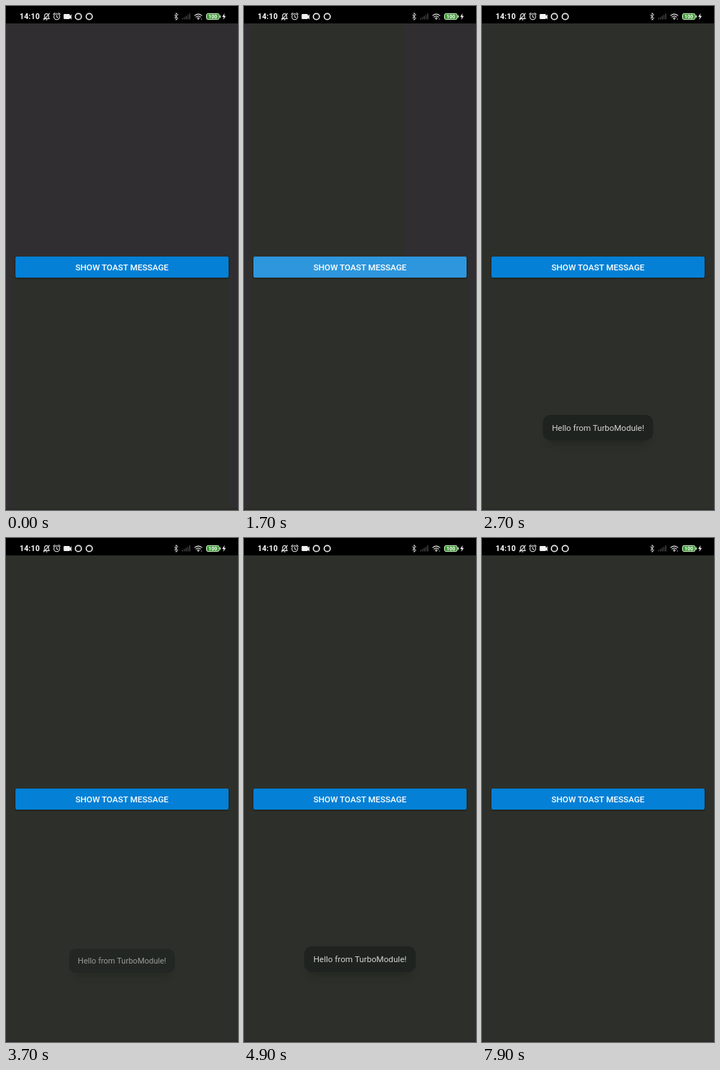
An HTML page that plays this animation: 320 by 694 pixels, repeating every 8.1 s.

```html
<!DOCTYPE html>
<html lang="en">
<head>
<meta charset="utf-8">
<title>Toast demo</title>
<style>
  html, body { margin: 0; width: 100%; height: 100%; overflow: hidden; background: #2d302a; }
  svg { display: block; width: 320px; height: 694px; }
  text { font-family: Roboto, "Noto Sans", sans-serif; fill: #fff; }
  .mid { text-anchor: middle; }
  .line { fill: none; stroke: #e4e4e4; stroke-width: 1.1; stroke-linecap: round; stroke-linejoin: round; }
  .solid { fill: #f0f0f0; }
</style>
</head>
<body>
<svg viewBox="0 0 320 694">
  <defs>
    <filter id="soft" x="-20%" y="-60%" width="140%" height="240%"><feGaussianBlur stdDeviation="5"/></filter>
    <filter id="edge" x="-5%" y="-30%" width="110%" height="160%"><feGaussianBlur stdDeviation="1"/></filter>
  </defs>

  <rect width="320" height="694" fill="#2d302a"/>
  <g id="tint" fill="#302e30">
    <rect id="upper" y="24" height="351"/>
    <rect y="24" width="9" height="670"/>
    <rect x="308" y="24" width="12" height="670"/>
  </g>
  <rect y="692" width="320" height="2" fill="#272a26"/>

  <!-- status bar -->
  <rect width="320" height="24" fill="#000"/>
  <text x="18.8" y="18.2" font-size="10.4" font-weight="700" letter-spacing=".2">14:10</text>
  <g class="line">
    <path d="M52 17.4h8M53.2 17v-3.3q0-2.9 2.8-3.2q2.8.3 2.8 3.2V17M55.2 19h1.6M52 19.2l8-9"/>
    <circle cx="70" cy="14.8" r="4"/>
    <path d="M70 12.6v2.4l1.6 1M65.3 11.4l2-1.8M74.7 11.4l-2-1.8"/>
    <circle cx="99.8" cy="14.5" r="4.2" stroke-width="1.7"/>
    <circle cx="114.8" cy="14.5" r="4.2" stroke-width="1.7"/>
    <path d="M232.4 12.2l4.8 4.8-2.6 2.4v-9.8l2.6 2.4-4.8 4.8" stroke-width=".9"/>
    <path d="M243.5 18v-1M246 18v-2.5M248.5 18v-4M251 18v-5.5M253.5 18v-7.5" stroke="#555"/>
    <path d="M260.3 13.2q4.9-4.2 9.8 0M262 15.2q3.2-2.7 6.4 0M263.8 17q1.4-1.2 2.8 0"/>
  </g>
  <path class="solid" d="M80.5 11h6.5q1 0 1 1v1.4l2.3-1.8v6.8l-2.3-1.8V17q0 1-1 1h-6.5q-1 0-1-1v-5q0-1 1-1z"/>
  <circle class="solid" cx="265.2" cy="18.3" r=".8"/>
  <circle cx="269.6" cy="18" r=".8" fill="#999"/>
  <rect x="276.5" y="10.4" width="17.6" height="8.2" rx="2.4" fill="#3f9a36" stroke="#d4edcf"/>
  <rect x="294.8" y="12.8" width="1.3" height="3.4" rx=".6" fill="#d4edcf"/>
  <text class="mid" x="285.3" y="17.1" font-size="7" font-weight="700">100</text>
  <path class="solid" d="M301.6 10l-3.4 5h2.2l-.9 4 3.7-5.3h-2.2z"/>

  <!-- button -->
  <rect x="13" y="346" width="294" height="29" rx="2" fill="#111" opacity=".6" filter="url(#edge)"/>
  <rect x="13" y="345" width="294" height="29" rx="2" fill="#0480d6"/>
  <rect id="glow" x="13" y="345" width="294" height="29" rx="2" fill="#fff"/>
  <text class="mid" x="160" y="363.7" font-size="11.65" font-weight="500">SHOW TOAST MESSAGE</text>

  <!-- toast, centred on its own origin -->
  <g id="toast">
    <rect x="-70" y="-6" width="140" height="30" rx="12" fill="#171a18" opacity=".4" filter="url(#soft)"/>
    <rect x="-76" y="-17.5" width="152" height="35" rx="10" fill="#1f2320"/>
    <text class="mid" y="4.1" font-size="11.5" style="fill:#d2d3d2">Hello from TurboModule!</text>
  </g>
</svg>
<script>
  const LOOP = 8100, STEP = 100;
  const TAPS = [1600, 4400];
  const get = id => document.getElementById(id);
  const [tint, upper, glow, toast] = ["tint", "upper", "glow", "toast"].map(get);
  const clamp = v => Math.min(1, Math.max(0, v));
  const ramp = (t, from, to) => clamp((t - from) / (to - from));

  function drawBackdrop(t) {
    const x = 8 + 62 * ramp(t, 500, 1100) + 250 * ramp(t, 1400, 1900);
    upper.setAttribute("x", x);
    upper.setAttribute("width", 320 - x);
    tint.setAttribute("opacity", 1 - ramp(t, 1700, 2000));
  }

  function drawGlow(t) {
    const press = tap => Math.min(ramp(t, tap - 100, tap + 100), 1 - ramp(t, tap + 200, tap + 400));
    glow.setAttribute("opacity", 0.17 * Math.max(...TAPS.map(press)));
  }

  function drawToast(t) {
    // The toast springs in after a tap, then shrinks and fades about two seconds later.
    const tap = TAPS.findLast(s => t >= s) ?? LOOP;
    const u = t - tap - 100;
    const leave = ramp(u, 1900, 2100);
    const spring = 0.116 * Math.exp(-u / 208) * Math.cos(u * Math.PI / 320);
    const scale = 1 - spring - 0.08 * leave;
    const y = 580.7 + 70 * spring + 3 * leave;
    const alpha = ramp(u, 0, 100) * (1 - leave) ** 0.6;
    toast.setAttribute("transform", `translate(160 ${y}) scale(${scale})`);
    toast.setAttribute("opacity", u > 0 ? alpha : 0);
  }

  const start = performance.now();
  function frame() {
    const t = Math.floor((performance.now() - start) % LOOP / STEP) * STEP;
    drawBackdrop(t);
    drawGlow(t);
    drawToast(t);
    requestAnimationFrame(frame);
  }
  frame();
</script>
</body>
</html>
```
